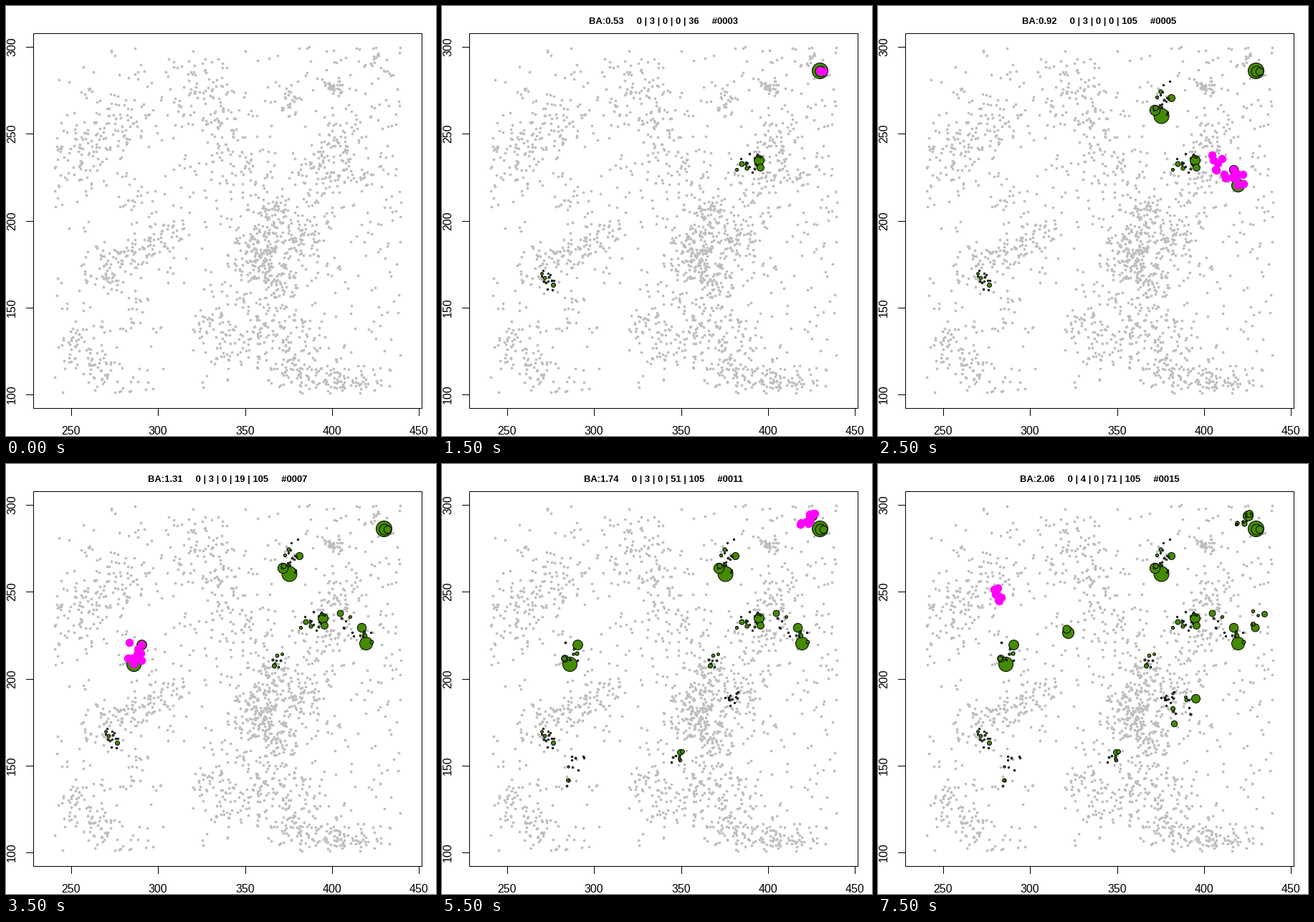
These frames come from a looping animation (600 px wide and 600 px high, 8000 ms). A matplotlib script:

```python
import numpy as np
import matplotlib.pyplot as plt
from matplotlib.animation import FuncAnimation

SIZE, DPI = 600, 100
PX = 72 / DPI  # points per pixel
GRAY, GREEN, PINK = "#bebebe", "#458b00", "#ff00ff"
SEEDLING = 1.5
TOP, BOTTOM, LEFT, RIGHT = 57, 542, 67, 551

plt.rcParams["font.family"] = "Liberation Sans"
fig = plt.figure(figsize=(SIZE / DPI, SIZE / DPI), dpi=DPI, facecolor="white")
ax = fig.add_axes([0, 0, 1, 1])
ax.set(xlim=(0, SIZE), ylim=(SIZE, 0))
ax.axis("off")

# Groves in order of arrival: largest tree, far end, tree count, largest radius.
GROVES = [
    ((442, 215), (417, 224), 19, 7.5),
    ((155, 389), (140, 373), 15, 3.5),
    ((527, 90), (531, 93), 3, 11.5),
    ((395, 153), (402, 112), 21, 11),
    ((502, 250), (467, 212), 17, 9.5),
    ((374, 281), (384, 267), 8, 3.5),
    ((178, 279), (182, 253), 11, 10.5),
    ((411, 320), (398, 332), 13, 2),
    ((176, 441), (194, 404), 11, 3),
    ((332, 402), (325, 413), 8, 4.5),
    ((516, 72), (503, 80), 12, 7.5),
    ((526, 228), (531, 207), 6, 6),
    ((443, 327), (414, 352), 10, 6.5),
    ((265, 235), (260, 227), 2, 8.5),
    ((168, 190), (163, 175), 9, SEEDLING),
]

# Denser bands of the stand: start, end, spread, tree count.
BANDS = [
    ((130, 365), (240, 312), 13, 110),
    ((82, 225), (185, 140), 20, 110),
    ((250, 80), (345, 260), 20, 140),
    ((345, 370), (375, 285), 17, 140),
    ((350, 350), (395, 395), 16, 120),
    ((400, 330), (490, 160), 18, 140),
    ((442, 104), (470, 121), 4, 32),
    ((285, 440), (420, 465), 28, 190),
    ((380, 515), (510, 522), 13, 110),
    ((90, 470), (150, 520), 18, 75),
]


def along(start, end, t):
    return np.outer(1 - t, start) + np.outer(t, end)


def grow(start, end, count, biggest, seed):
    """Scatter trees from the largest one to the far end; sizes fall off fast."""
    rng = np.random.default_rng(seed)
    spread = min(0.4 * np.hypot(*np.subtract(end, start)), 12)
    xy = along(start, end, np.linspace(0, 1, count))
    xy[1:] += rng.uniform(-spread, spread, (count - 1, 2))
    rank = np.append(0, 1 + rng.permutation(count - 1))
    radius = SEEDLING + (biggest - SEEDLING) * 0.65 ** rank
    trees = np.column_stack([xy.round(), radius])
    return trees[np.argsort(rank)]


def stand(seed=4):
    rng = np.random.default_rng(seed)
    parts = [rng.uniform((LEFT, TOP), (RIGHT, BOTTOM), (680, 2))]
    for start, end, spread, count in BANDS:
        parts.append(along(start, end, rng.random(count))
                     + rng.normal(0, spread, (count, 2)))
    pts = np.vstack(parts)
    x, y = pts.T
    inside = (x >= LEFT) & (x <= RIGHT) & (y >= TOP) & (y <= BOTTOM)
    clearing = (x > 221) & (x < 260) & (y > 394)
    return pts[inside & ~clearing].round()


def line(xs, ys):
    ax.plot(xs, ys, color="black", lw=PX, antialiased=False,
            solid_capstyle="projecting", zorder=1)


def draw_frame():
    line([38, 580, 580, 38, 38], [38, 38, 561, 561, 38])
    for v in range(250, 451, 50):
        x = round(91 + (v - 250) * 2.425)
        line([x, x], [561, 571])
        ax.text(x, 598, str(v), size=16 * PX, ha="center", va="baseline")
    for v in range(100, 301, 50):
        y = round(542 - (v - 100) * 2.425)
        line([28, 38], [y, y])
        ax.text(16, y - 0.5, str(v), size=16 * PX, rotation=90,
                ha="right", va="center")


def dots(color, edge=0, zorder=2):
    return ax.scatter([], [], s=[], c=color, edgecolors="black",
                      linewidths=edge, zorder=zorder)


def place(layer, xy, diameter):
    layer.set_offsets(xy + 0.5)
    layer.set_sizes(np.broadcast_to((diameter * PX) ** 2, len(xy)))


def caption(step):
    """Basal area, tallies and step number."""
    area = np.interp(step, [1, 2, 4, 7, 9, 11, 15],
                     [0.26, 0.33, 0.73, 1.31, 1.5, 1.74, 2.06])
    second = 3 * (step >= 3) + (step >= 14)
    fourth = int(np.interp(step, [5, 7, 9, 11, 15], [0, 19, 33, 51, 71]))
    fifth = int(np.interp(step, [1, 2, 3, 4, 5], [20, 36, 36, 71, 105]))
    gap = " " * 5
    return (f"BA:{round(area, 2):g}{gap}0 | {second} | 0 | {fourth} | {fifth}"
            f"{gap}#{step:04d}")


groves = [grow(*g, seed=i) for i, g in enumerate(GROVES)]
none = np.empty((0, 3))

draw_frame()
place(dots(GRAY), np.vstack([stand()] + [g[:, :2] for g in groves]), 3.8)
grown = dots(GREEN, PX, 3)
fresh = dots(PINK, 0, 4)
title = ax.text(309, 24.5, "", size=13 * PX, weight="bold",
                ha="center", va="baseline")


def update(step):
    shown = np.vstack([none] + groves[:step])
    place(grown, shown[:, :2], 2 * shown[:, 2] - 1)
    newest = groves[step - 1] if step else none
    place(fresh, newest[:, :2], 11.5)
    title.set_text(caption(step) if step else "")
    return grown, fresh, title


anim = FuncAnimation(fig, update, frames=len(groves) + 1, interval=500,
                     repeat=True, repeat_delay=0, blit=False)
plt.show()
```
